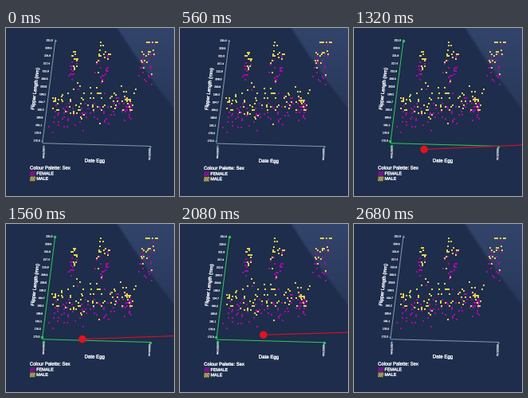
Write a matplotlib script that moves like this. It is 211 px wide and 211 px high and loops after 2.72 s.

```python
import numpy as np
import matplotlib.pyplot as plt
from matplotlib.animation import FuncAnimation
from matplotlib.patches import Circle, Rectangle
from matplotlib.patheffects import withStroke
from matplotlib.transforms import Affine2D

SIZE, STEP, FRAMES = 211, 40, 68
LOOP = STEP * FRAMES
PX = 72 / SIZE  # one pixel in points
APPEAR, SETTLE, LEAVE = 1120, 1320, 2520  # pointer times in ms
WHITE, GREEN, IDLE, CAP = "#eef1f6", "#2ccb58", "#8499ad", "#5fb3c4"
YELLOW, MAGENTA, RED, NAVY = "#e6d254", "#ab06ae", "#e3121e", "#1e2d4b"

plt.rcParams["font.family"] = "Liberation Sans"
fig = plt.figure(figsize=(1, 1), dpi=SIZE)
ax = fig.add_axes([0, 0, 1, 1])
ax.set_xlim(0, SIZE)
ax.set_ylim(SIZE, 0)
ax.axis("off")

# Backdrop: navy with a pale beam fading down the right edge
yy, xx = np.mgrid[0:SIZE, 0:SIZE] + 0.5
edge = xx - (140 + 0.62 * yy + 0.0008 * yy**2)
beam = np.clip(edge / 5 + 0.5, 0, 1) * np.clip(1 - yy / 135, 0, 1) ** 0.6
base, glow = np.array([30, 45, 75]), np.array([51, 68, 107])
sky = base + beam[..., None] * (glow - base)
ax.imshow(sky / 255, extent=(0, SIZE, SIZE, 0), interpolation="nearest", zorder=0)
ax.set_aspect("auto")

# Everything on the chart sways together
sway = Affine2D()
world = sway + ax.transData


def place(u, v):
    """Map date u and length v, both 0 to 1, onto the slanted chart."""
    return 46 + 16 * v + 134 * u, 141.5 - 126 * v


def label(x, y, text, size, angle=0, ha="center", stroke=0.3):
    ax.text(x, y, text, fontsize=size * PX, rotation=angle, ha=ha, va="center",
            rotation_mode="anchor", color=WHITE, transform=world, zorder=4,
            path_effects=[withStroke(linewidth=stroke * PX, foreground=WHITE)])


def line(xs, ys, width, color=IDLE, z=2):
    return ax.plot(xs, ys, color=color, lw=width * PX, transform=world, zorder=z)[0]


def draw_points(u, v, color, w, h):
    u, v = np.round(u * 70) / 70, np.round(v * 59) / 59
    x, y = place(u, v)
    shape = [(-w, -h), (w, -h), (w, h), (-w, h), (-w, -h)]
    ax.plot(x, y, ls="", marker=shape, ms=2 * w * PX,
            color=color, mew=0, transform=world, zorder=3)


def draw_sex(rng, color, small, large, w, h):
    """One broad low cloud plus a tall narrow group in each season."""
    n = 85
    u = 0.04 + 0.79 * rng.random(n) ** 1.1
    v = rng.normal(small, 0.085, n) + 0.07 * (u - 0.4)
    draw_points(u, np.clip(v, 0.01, 0.6), color, w, h)
    for centre, spread, count in [(0.2, 0.035, 14), (0.47, 0.06, 18), (0.89, 0.065, 22)]:
        u = centre + spread * rng.uniform(-1, 1, count)
        v = rng.normal(large, 0.085, count) + 0.06 * (centre - 0.5)
        draw_points(u, np.clip(v, 0.5, 0.98), color, w, h)


rng = np.random.default_rng(12)
draw_sex(rng, MAGENTA, 0.29, 0.69, 1.4, 0.75)
draw_sex(rng, YELLOW, 0.39, 0.84, 0.9, 0.9)

# Axes and their end caps
axes = [line([62, 46], [15, 142], 1), line([46, 181], [144.7, 148.4], 1)]
caps = ax.plot([61.5, 45, 47, 181], [15.5, 141.5, 147.5, 149], ls="", marker="o",
               mew=0, transform=world, zorder=3)[0]

for v in np.linspace(0, 1, 14):
    x, y = place(0, v)
    label(x - 3.5, y, f"{172 + 59 * v:.1f}", 3.2, -1, "right", 0.15)
label(37, 76.5, "Flipper Length (mm)", 5.9, 83)
label(111.5, 167, "Date Egg", 6.1, -1)
label(47.3, 156.5, "09/11/2007", 2.9, 88, stroke=0.15)
label(180.3, 158.5, "01/12/2009", 2.9, 88, stroke=0.15)

# Legend with hatched swatches
label(30, 176, "Colour Palette: Sex", 5.9, 0, "left")
for y, name, color in [(182.9, "FEMALE", MAGENTA), (189.4, "MALE", YELLOW)]:
    ax.add_patch(Rectangle((30.3, y - 2.8), 6.4, 5.6, lw=0, color=color,
                           snap=False, transform=world, zorder=3))
    for k in range(3):
        line([30.3 + 2.1 * k, 32.4 + 2.1 * k], [y - 2.8, y + 2.8], 0.7, NAVY, 3.5)
    label(38.4, y, name, 5.4, 0, "left")

# Laser pointer
ray = ax.plot([], [], color="#c8142a", lw=1.2 * PX, zorder=5)[0]
ball = ax.add_patch(Circle((0, 0), 4.7, color=RED, lw=0, zorder=6))


def update(n):
    t = n * STEP
    phase = 2 * np.pi * t / LOOP
    sway.clear().translate(-0.25 * np.sin(2 * phase), 0.2 * (1 - np.cos(2 * phase)))

    active = APPEAR <= t < LEAVE
    for a in axes:
        a.set_color(GREEN if active else IDLE)
    caps.set_color(GREEN if active else CAP)
    caps.set_markersize((3.4 if active else 2.2) * PX)

    # A quick sweep in, then a slow drift that rises early
    sweep = np.clip((t - APPEAR) / (SETTLE - APPEAR), 0, 1)
    sweep *= sweep * (3 - 2 * sweep)
    drift = np.clip((t - SETTLE) / 1080, 0, 1)
    rise = 1 - (1 - drift) ** 3.5
    x = 17 + 71 * sweep + 21 * drift**0.65
    y = 160 - 7.5 * sweep - 13.5 * rise
    ball.center = x, y
    ray.set_data([x, SIZE], [y, 153 - 6 * sweep - 11 * rise])
    ray.set_visible(active)
    ball.set_visible(active)
    return []


anim = FuncAnimation(fig, update, frames=FRAMES, interval=STEP,
                     init_func=lambda: update(0), repeat=True, repeat_delay=0)
plt.show()
```
